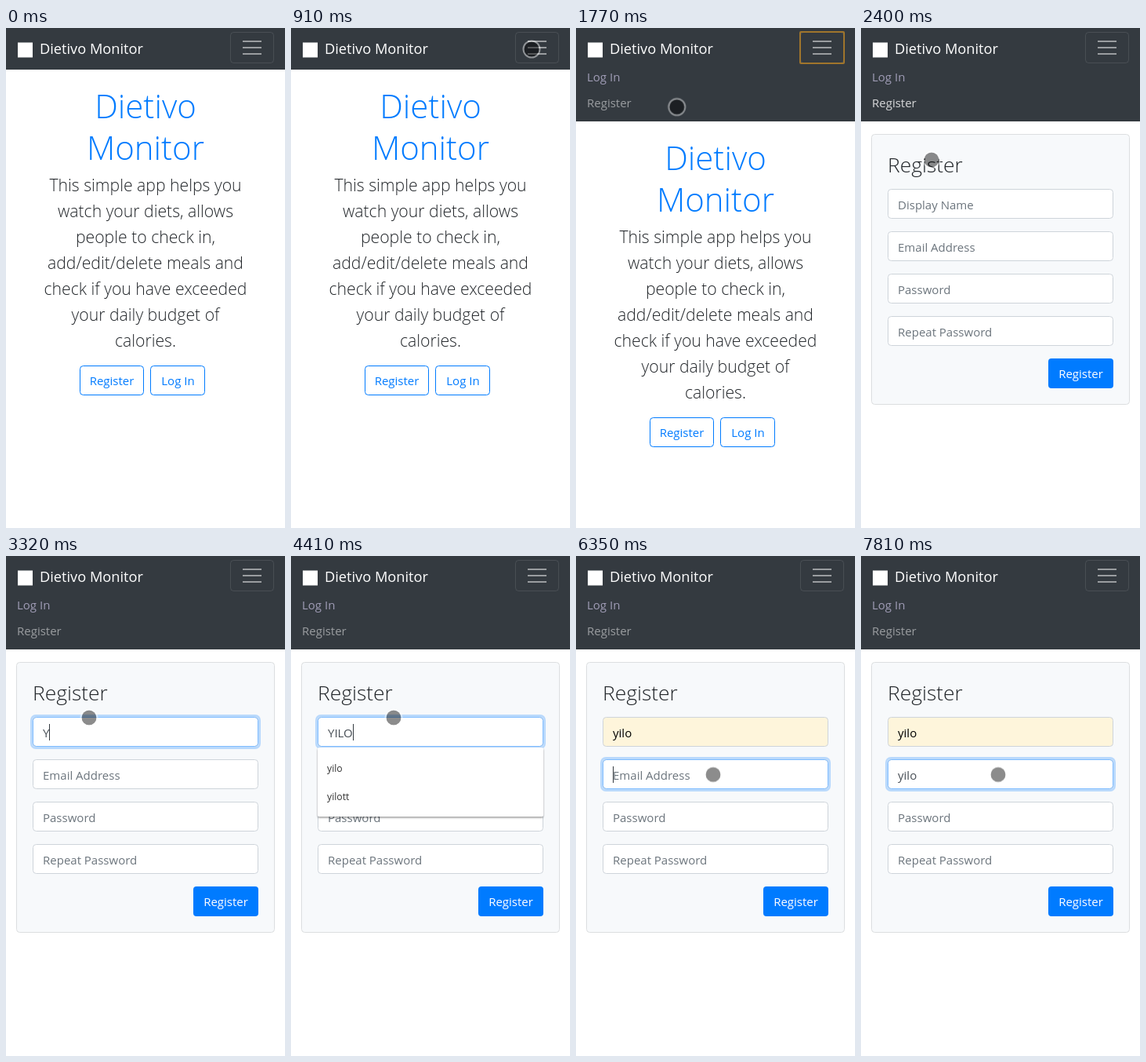
Write an HTML page that moves like this. It is 356 by 637 pixels and loops after 8000 ms.

```html
<!DOCTYPE html>
<html lang="en">
<head>
<meta charset="utf-8">
<title>Dietivo Monitor</title>
<style>
html, body { margin: 0; width: 100%; height: 100%; overflow: hidden; background: #fff; }
svg { display: block; width: 100vw; height: 100vh; }
text { font: 15px "Open Sans", "Noto Sans", sans-serif; white-space: pre; }
.mid { text-anchor: middle; }
.h1 { font-size: 42px; font-weight: 300; fill: #007bff; }
.lead { font-size: 21.2px; font-weight: 300; fill: #212529; }
.h2 { font-size: 26.4px; font-weight: 300; fill: #212529; }
.brand { font-size: 18.2px; fill: #fff; }
.small { font-size: 12.2px; fill: #333; }
.link { fill: rgba(255, 255, 255, .5); }
.outline rect { fill: #fff; stroke: #007bff; }
.outline text { fill: #007bff; }
.box { fill: #fff; stroke: #ced4da; }
.ring { fill: none; opacity: 0; }
.drop, .ring, #cursor { animation: 8s infinite linear; }

.drop { animation-name: drop; }
@keyframes drop {
  0%, 13% { transform: translateY(0); animation-timing-function: ease; }
  17.375%, 100% { transform: translateY(66px); }
}
#ring0 { animation-name: ringName; }
#ring1 { animation-name: ringEmail; }
#ring2 { animation-name: ringPassword; }
@keyframes ringName { 0%, 36.6% { opacity: 0 } 38.5%, 68.5% { opacity: 1 } 70.4%, 100% { opacity: 0 } }
@keyframes ringPassword { 0%, 68.5% { opacity: 0 } 70.4%, 72.9% { opacity: 1 } 74.4%, 100% { opacity: 0 } }
@keyframes ringEmail { 0%, 72.9% { opacity: 0 } 74.4%, 100% { opacity: 1 } }

#cursor { animation-name: wander; }
@keyframes wander {
  0%, 5.625% { transform: translate(282px, 69px); animation-timing-function: steps(6); }
  11.375%, 13.25% { transform: translate(307px, 27px); animation-timing-function: steps(3); }
  16.25% { transform: translate(323px, 87px); animation-timing-function: steps(7); }
  23.125% { transform: translate(51px, 106px); animation-timing-function: step-end; }
  24.125% { transform: translate(51px, 108px); animation-timing-function: step-end; }
  30% { transform: translate(90px, 168px); animation-timing-function: steps(4); }
  33.75%, 50.24% { transform: translate(106px, 206px); animation-timing-function: step-end; }
  50.25% { transform: translate(108px, 206px); animation-timing-function: step-end; }
  51.25% { transform: translate(110px, 206px); animation-timing-function: step-end; }
  55.125% { transform: translate(131px, 206px); animation-timing-function: steps(3); }
  58%, 65.625% { transform: translate(179px, 258px); animation-timing-function: steps(2); }
  67.5% { transform: translate(165px, 324px); animation-timing-function: step-end; }
  68.5% { transform: translate(163px, 304px); animation-timing-function: steps(3); }
  71.375% { transform: translate(166px, 278.5px); animation-timing-function: step-end; }
  77.25%, 100% { transform: translate(175px, 278.5px); }
}
</style>
</head>
<body>
<svg viewBox="0 0 356 637">
  <defs>
    <clipPath id="navClip"><rect class="drop" y="-67" width="356" height="120"/></clipPath>
    <filter id="shadow" x="-5%" y="-5%" width="110%" height="115%">
      <feDropShadow dx="0" dy="1.5" stdDeviation="1.2" flood-opacity=".4"/>
    </filter>
  </defs>

  <g data-on="0 2160"><g class="drop">
    <g class="mid" id="intro">
      <text class="h1" x="178" y="115">Dietivo</text>
      <text class="h1" x="178" y="168">Monitor</text>
    </g>
    <g class="outline mid">
      <rect x="94.5" y="430.5" width="81" height="37" rx="4"/>
      <text x="135" y="455">Register</text>
      <rect x="184.5" y="430.5" width="69" height="37" rx="4"/>
      <text x="219.5" y="455">Log In</text>
    </g>
  </g></g>

  <g data-on="2160 8000">
    <rect x="13.5" y="135.5" width="329" height="344" rx="4" fill="#f7f9fb" stroke="#dcdee0"/>
    <text class="h2" x="34" y="184">Register</text>
    <g id="fields"></g>
    <rect x="239" y="421" width="83" height="38" rx="4" fill="#007bff"/>
    <text class="mid" x="280.5" y="446" fill="#fff">Register</text>
    <rect id="caret" y="322" width="1" height="21" fill="#343a40"/>
    <g data-on="3320 4950">
      <rect x="34" y="244" width="288" height="88" rx="2" fill="#fff" filter="url(#shadow)"/>
      <rect data-on="4790 4950" x="34" y="252" width="288" height="36" fill="#eee"/>
      <text class="small" x="46" y="275">yilo</text>
      <text class="small" x="46" y="311">yilott</text>
    </g>
  </g>

  <g clip-path="url(#navClip)">
    <rect width="356" height="119" fill="#343a40"/>
    <rect x="15" y="18.5" width="19" height="19" fill="#fff"/>
    <text class="brand" x="43" y="33">Dietivo Monitor</text>
    <rect x="286.5" y="5.5" width="55" height="39" rx="4" fill="none" stroke="#fff" stroke-opacity=".1"/>
    <path d="M302 17h24M302 25h24M302 33h24" stroke="#fff" stroke-opacity=".5" stroke-width="2"/>
    <rect data-on="1060 2080" x="286" y="5" width="56" height="40" rx="1" fill="none" stroke="#a0752c" stroke-width="2"/>
    <text x="14" y="68" fill="#a09db6">Log In</text>
    <text class="link" x="14" y="101">Register</text>
    <text class="link" x="14" y="101" data-on="1850 2480">Register</text>
  </g>

  <g data-on="450 8000"><g id="cursor">
    <circle r="9.5" fill-opacity=".45"/>
    <circle r="10.5" fill="none" stroke="#fff" stroke-opacity=".45" stroke-width="2"/>
  </g></g>
</svg>
<script>
const $ = id => document.getElementById(id);

function add(parent, tag, attrs, text = '') {
  const el = document.createElementNS('http://www.w3.org/2000/svg', tag);
  for (const key in attrs) el.setAttribute(key, attrs[key]);
  el.textContent = text;
  return parent.appendChild(el);
}

['This simple app helps you', 'watch your diets, allows', 'people to check in,',
 'add/edit/delete meals and', 'check if you have exceeded', 'your daily budget of', 'calories.']
  .forEach((line, i) => add($('intro'), 'text', { class: 'lead', x: 178, y: 208 + 33 * i }, line));

// typed: [time, value] pairs; caret: [from, to] spans
const fields = [
  { label: 'Display Name', caret: [[2930, 4410]],
    typed: [[3240, 'Y'], [3480, 'YI'], [3790, 'YIL'], [3870, 'YILO'], [4790, 'yilo']] },
  { label: 'Email Address', caret: [[5880, 7350], [7810, 8000]],
    typed: [[6350, 'y'], [6580, 'yi'], [6730, 'yil'], [6810, 'yilo']] },
  { label: 'Password', caret: [[5480, 5880]], typed: [] },
  { label: 'Repeat Password', caret: [], typed: [] }
];

fields.forEach((field, i) => {
  field.y = 205 + 54 * i;
  const frame = { x: 34.5, y: field.y + .5, width: 287, height: 37, rx: 4 };
  field.box = add($('fields'), 'rect', { class: 'box', ...frame });
  const ring = add($('fields'), 'g', { class: 'ring', id: 'ring' + i });
  add(ring, 'rect', { x: 32.5, y: field.y - 1.5, width: 291, height: 41, rx: 5.5,
    stroke: '#007bff', 'stroke-opacity': .25, 'stroke-width': 3 });
  add(ring, 'rect', { ...frame, stroke: '#80bdff' });
  field.text = add($('fields'), 'text', { x: 47, y: field.y + 26 });
});

const timed = [...document.querySelectorAll('[data-on]')]
  .map(el => ({ el, span: el.dataset.on.split(' ').map(Number) }));
const within = (t, [from, to]) => t >= from && t < to;
const clock = $('cursor').getAnimations()[0];

function draw() {
  const t = (clock.currentTime || 0) % 8000;
  for (const { el, span } of timed) el.style.visibility = within(t, span) ? 'inherit' : 'hidden';

  let caretShown = false;
  fields.forEach((field, i) => {
    const value = field.typed.filter(([at]) => t >= at).pop()?.[1] || '';
    const filled = i === 0 && t >= 4790;
    field.text.textContent = value || field.label;
    field.text.style.fill = filled ? '#000' : value ? '#495057' : '#6c757d';
    field.box.style.fill = filled ? '#fef5db' : '#fff';
    if (field.caret.some(span => within(t, span))) {
      caretShown = true;
      $('caret').setAttribute('x', Math.round(47 + (value ? field.text.getComputedTextLength() : 0)));
      $('caret').setAttribute('y', field.y + 9);
    }
  });
  $('caret').style.visibility = caretShown ? 'inherit' : 'hidden';
  requestAnimationFrame(draw);
}
draw();
</script>
</body>
</html>
```
